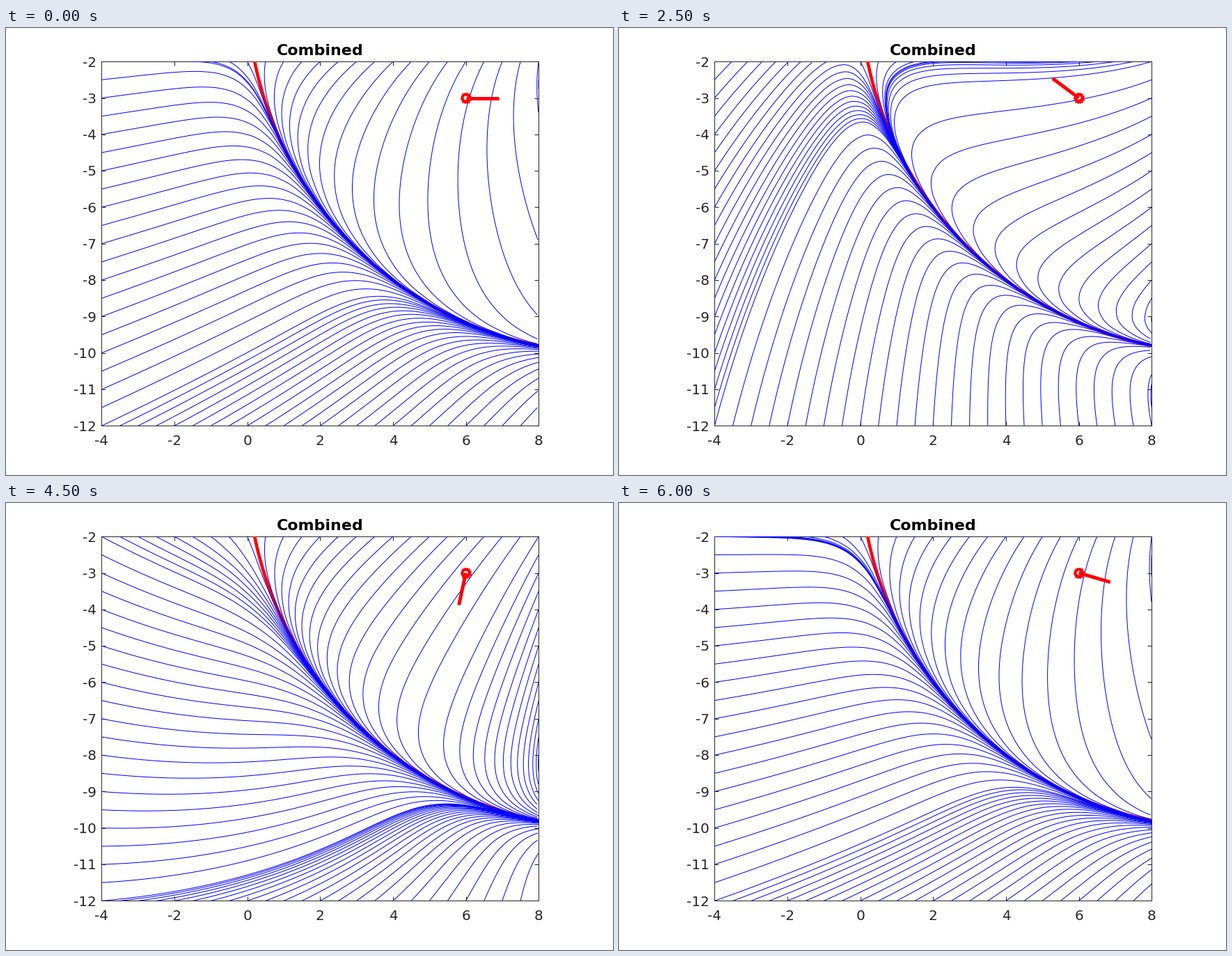
A matplotlib script for the animation above (6500 ms loop, 872 by 642 pixels).

```python
import numpy as np
import matplotlib.pyplot as plt
from matplotlib.animation import FuncAnimation
from matplotlib.collections import LineCollection
from matplotlib.patches import Rectangle

W, H, DPI = 872, 642, 100
PX = 72 / DPI                        # one pixel in points
LEFT, RIGHT, TOP, BOTTOM = 137.3, 765.2, 48.2, 571.4
X0, X1, Y0, Y1 = -4, 8, -12, -2
FRAMES, TURN = 13, 0.5               # radians the push turns per frame

CENTER, RADIUS = np.array([10.0, 0.0]), 10.0
PUSH = 0.61                          # strength of the rotating push
DECAY = 0.078                        # how fast circling fades off the path
CELL = 0.5                           # spacing of field samples and seeds
STEP, MAX_STEPS = 0.1 * CELL, 900
ANCHOR, ARM = np.array([6.0, -3.0]), 0.9
DARK, RED, BLUE = "#262626", "#ff0000", "#0000ff"

plt.rcParams["font.family"] = "DejaVu Sans"


def to_px(p):
    p = np.asarray(p, float)
    x = LEFT + (p[..., 0] - X0) * (RIGHT - LEFT) / (X1 - X0)
    y = TOP + (Y1 - p[..., 1]) * (BOTTOM - TOP) / (Y1 - Y0)
    return np.stack([x, y], axis=-1)


def unit(v):
    return v / np.maximum(np.linalg.norm(v, axis=-1, keepdims=True), 1e-9)


def heading(angle):
    return np.array([np.cos(angle), np.sin(angle)])


def field(p, push):
    """Circle along the path near it; approach it under the push far away."""
    radial = p - CENTER
    phi = (radial ** 2).sum(axis=-1, keepdims=True) - RADIUS ** 2
    radial = unit(radial)
    tangent = np.stack([-radial[..., 1], radial[..., 0]], axis=-1)
    approach = unit(-np.sign(phi) * radial + push)
    reach = DECAY * np.abs(phi)
    return tangent / np.cosh(reach) + np.tanh(reach) * approach


XS = np.arange(X0, X1 + CELL / 2, CELL)
YS = np.arange(Y0, Y1 + CELL / 2, CELL)
NODES = np.stack(np.meshgrid(XS, YS, indexing="ij"), axis=-1)
on_border = np.zeros(NODES.shape[:2], bool)
on_border[[0, -1], :] = on_border[:, [0, -1]] = True
SEEDS = NODES[on_border]


def sample(grid, p):
    """Bilinear lookup of the sampled field."""
    g = (p - [X0, Y0]) / CELL
    i = np.clip(g.astype(int), 0, [len(XS) - 2, len(YS) - 2])
    fx, fy = np.split(g - i, 2, axis=1)
    ix, iy = i.T
    low = (1 - fx) * grid[ix, iy] + fx * grid[ix + 1, iy]
    high = (1 - fx) * grid[ix, iy + 1] + fx * grid[ix + 1, iy + 1]
    return (1 - fy) * low + fy * high


def inside(p):
    x, y = p.T
    return (x >= X0) & (x <= X1) & (y >= Y0) & (y <= Y1)


def streamlines(angle):
    grid = field(NODES, PUSH * heading(angle))
    p = SEEDS
    alive = np.ones(len(p), bool)
    length = np.ones(len(p), int)
    trail = [p]
    for _ in range(MAX_STEPS):
        v = sample(grid, p)
        speed = np.maximum(np.abs(v).max(axis=1, keepdims=True), 1e-9)
        moved = p + STEP * v / speed
        alive = alive & inside(moved)
        if not alive.any():
            break
        p = np.where(alive[:, None], moved, p)
        length += alive
        trail.append(p)
    trail = to_px(np.array(trail))
    return [trail[:n, i] for i, n in enumerate(length) if n > 1]


fig = plt.figure(figsize=(W / DPI, H / DPI), dpi=DPI, facecolor="white")
ax = fig.add_axes([0, 0, 1, 1])
ax.set_xlim(0, W)
ax.set_ylim(H, 0)
ax.axis("off")


def stroke(x, y, color=DARK, width=1, **kw):
    return ax.plot(x, y, color=color, lw=width * PX,
                   solid_capstyle="butt", **kw)[0]


def label(x, y, text, ha, size=20, **kw):
    kw.setdefault("color", DARK)
    ax.text(x, y, text, ha=ha, va="baseline", fontsize=size * PX, **kw)


# frame, ticks and labels
ax.add_patch(Rectangle((LEFT, TOP), RIGHT - LEFT, BOTTOM - TOP,
                       fill=False, ec=DARK, lw=PX, zorder=1))
TICK = 6
for v in range(X0, X1 + 1, 2):
    x = to_px((v, Y0))[0]
    stroke([x, x], [BOTTOM, BOTTOM - TICK], zorder=1)
    stroke([x, x], [TOP, TOP + TICK], zorder=1)
    label(x, 599, str(v), "center")
for v in range(Y0, Y1 + 1):
    y = to_px((X0, v))[1]
    stroke([LEFT, LEFT + TICK], [y, y], zorder=1)
    stroke([RIGHT, RIGHT - TICK], [y, y], zorder=1)
    label(130, y + 7.3, str(v), "right")
label((LEFT + RIGHT) / 2, 39, "Combined", "center", 22.2,
      weight="bold", color="black")

# the circular path and the flow over it
clip = Rectangle((LEFT, TOP), RIGHT - LEFT, BOTTOM - TOP,
                 transform=ax.transData)
arc = np.linspace(np.pi, 1.5 * np.pi, 300)
path = to_px(CENTER + RADIUS * np.stack([np.cos(arc), np.sin(arc)], axis=-1))
stroke(*path.T, RED, 4.6, zorder=2).set_clip_path(clip)
flow = LineCollection([], colors=BLUE, linewidths=PX, zorder=3)
ax.add_collection(flow)
flow.set_clip_path(clip)

# notched ring and its turning arm
hub = to_px(ANCHOR)
turn = np.linspace(0, 2 * np.pi, 61)
stroke(hub[0] + 5 * np.cos(turn), hub[1] + 5 * np.sin(turn), RED, 4, zorder=4)
teeth = np.arange(14) * 2 * np.pi / 14
ax.plot(hub[0] + 6.7 * np.cos(teeth), hub[1] + 6.7 * np.sin(teeth), "o",
        color=RED, ms=2.8 * PX, mew=0, zorder=4)
arm = stroke([], [], RED, 5, zorder=5)


def draw(frame):
    angle = TURN * frame
    flow.set_segments(streamlines(angle))
    arm.set_data(*to_px([ANCHOR, ANCHOR + ARM * heading(angle)]).T)
    return flow, arm


anim = FuncAnimation(fig, draw, frames=FRAMES, interval=500,
                     repeat=True, repeat_delay=0, blit=False)
plt.show()
```
